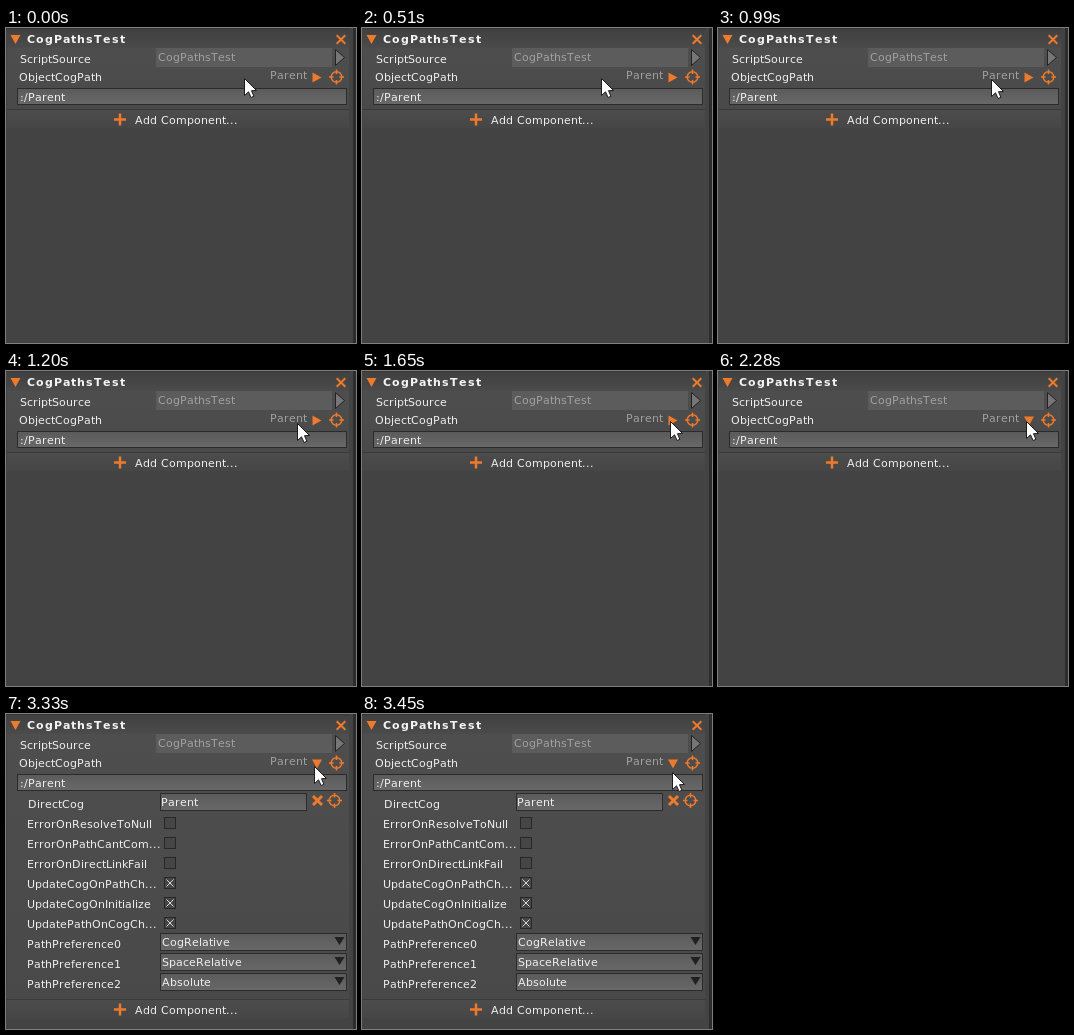
Write an HTML page with a canvas that moves like this. It is 350 px wide and 315 px high and loops after 3.48 s.

```html
<!DOCTYPE html>
<html lang="en">
<head>
<meta charset="utf-8">
<title>Property panel</title>
<style>
  html, body { margin: 0; width: 100%; height: 100%; overflow: hidden; background: #434343; }
  canvas { display: block; }
</style>
</head>
<body>
<canvas id="stage" width="350" height="315"></canvas>
<script>
const ctx = document.getElementById('stage').getContext('2d');
const LOOP = 3480, TICK = 30;
const OPEN_AT = 2280, EXPANDED = 204;
const ORANGE = '#ee7a2c', TEXT = '#eeeeee', DIM = '#a0a0a0', DARK = '#2b2b2b';

// Pointer stops: time, x, y, horizontal speed (px per ms)
const PATH = [
  [420, 238.5, 50, 0],
  [810, 257.5, 50, .07],
  [1200, 291.5, 52, .065],
  [1650, 308.5, 50, 0],
  [3300, 308.5, 50, 0],
  [3450, 310.5, 58, 0]
];

const CHECKS = [
  ['ErrorOnResolveToNull', false],
  ['ErrorOnPathCantCom...', false],
  ['ErrorOnDirectLinkFail', false],
  ['UpdateCogOnPathCh...', true],
  ['UpdateCogOnInitialize', true],
  ['UpdatePathOnCogCh...', true]
];
const PREFERENCES = ['CogRelative', 'SpaceRelative', 'Absolute'];

function rect(x, y, w, h, fill) {
  ctx.fillStyle = fill;
  ctx.fillRect(x, y, w, h);
}

function shade(x, y, w, h, top, bottom) {
  const g = ctx.createLinearGradient(0, y, 0, y + h);
  g.addColorStop(0, top);
  g.addColorStop(1, bottom);
  rect(x, y, w, h, g);
}

// Letters advance by whole pixels, as in hinted interface text.
// Widths come from a large size, where they are not yet rounded.
function text(str, x, baseline, color = TEXT, weight = 'normal', spacing = 0) {
  const font = size => `${weight} ${size}px "DejaVu Sans", sans-serif`;
  ctx.font = font(110);
  const advances = [...str].map(ch => Math.round(ctx.measureText(ch).width / 10 + .05) + spacing);
  ctx.font = font(11);
  ctx.fillStyle = color;
  advances.forEach((advance, i) => {
    ctx.fillText(str[i], x, baseline);
    x += advance;
  });
}

function polygon(points, fill, stroke) {
  ctx.beginPath();
  points.forEach(([x, y]) => ctx.lineTo(x, y));
  ctx.closePath();
  ctx.fillStyle = fill;
  ctx.fill();
  if (stroke) {
    ctx.strokeStyle = stroke;
    ctx.lineWidth = 1;
    ctx.stroke();
  }
}

function lines(color, width, ...segments) {
  ctx.strokeStyle = color;
  ctx.lineWidth = width;
  ctx.beginPath();
  for (const [x1, y1, x2, y2] of segments) {
    ctx.moveTo(x1, y1);
    ctx.lineTo(x2, y2);
  }
  ctx.stroke();
}

function cross(x, y, r, color, width) {
  lines(color, width, [x - r, y - r, x + r, y + r], [x - r, y + r, x + r, y - r]);
}

function field(x, y, w, h) {
  rect(x, y, w, h, DARK);
  shade(x + 1, y + 1, w - 2, h - 2, '#5b5b5b', '#686868');
}

function arrowDown(x, y) {
  polygon([[x - 5, y - 4], [x + 5, y - 4], [x, y + 5]], ORANGE);
}

function crosshair(x, y) {
  ctx.strokeStyle = ORANGE;
  ctx.lineWidth = 1.5;
  ctx.beginPath();
  ctx.arc(x, y, 5.3, 0, Math.PI * 2);
  ctx.stroke();
  lines(ORANGE, 1.5, [x - 7.5, y, x - 3, y], [x + 3, y, x + 7.5, y],
    [x, y - 7.5, x, y - 3], [x, y + 3, x, y + 7.5]);
}

function drawHeader(open) {
  shade(1, 1, 342, 19, '#404040', '#4b4b4b');
  rect(0, 0, 344, 1, '#363636');
  arrowDown(9.5, 11);
  text('CogPathsTest', 21, 15, '#f4f4f4', 'bold', 1);
  cross(335, 11.5, 4.3, ORANGE, 2);

  text('ScriptSource', 14, 35);
  rect(150, 20, 176, 19, '#5c5c5c');
  text('CogPathsTest', 152, 33, DIM);
  polygon([[329.5, 21.5], [338.5, 29.5], [329.5, 37.5]], '#767676', '#222222');

  text('ObjectCogPath', 13, 53);
  text('Parent', 264, 51, DIM);
  if (open) arrowDown(311, 49.5);
  else polygon([[306.5, 44.5], [315.5, 49.5], [306.5, 54.5]], ORANGE);
  crosshair(330.5, 49);

  field(11, 60, 330, 17);
  text(':/Parent', 14, 73);
}

function drawDetails() {
  text('DirectCog', 22, 94);
  field(154, 79, 147, 18);
  text('Parent', 155, 92);
  cross(311.5, 86.5, 4.5, ORANGE, 3);
  crosshair(328.5, 86.5);

  CHECKS.forEach(([label, checked], i) => {
    const y = 114 + i * 20;
    text(label, 21, y);
    rect(158, y - 11, 12, 12, '#272727');
    rect(159, y - 10, 10, 10, '#464646');
    if (checked) cross(164, y - 5, 3.5, '#d8d8d8', 1);
  });

  PREFERENCES.forEach((value, i) => {
    const y = 234 + i * 20;
    text('PathPreference' + i, 21, y);
    field(154, y - 15, 187, 18);
    text(value, 156, y - 2);
    polygon([[328.5, y - 11], [338.5, y - 11], [333.5, y - 3]], '#202020');
  });
}

function drawFooter(y) {
  rect(1, y + 81, 342, 1, '#3a3a3a');
  shade(1, y + 82, 342, 18, '#4c4c4c', '#464646');
  lines(ORANGE, 2.5, [108, y + 91.5, 120, y + 91.5], [114, y + 85.5, 114, y + 97.5]);
  text('Add Component...', 129, y + 96);
}

function pointerAt(t) {
  if (t <= PATH[0][0]) return PATH[0].slice(1, 3);
  const i = PATH.findIndex(p => p[0] >= t);
  const [t0, x0, y0, v0] = PATH[i - 1], [t1, x1, y1, v1] = PATH[i];
  const d = t1 - t0, u = (t - t0) / d, s = u * u * (3 - 2 * u);
  const x = x0 + (x1 - x0) * s + d * (v0 * u * (1 - u) ** 2 - v1 * u * u * (1 - u));
  return [x, y0 + (y1 - y0) * u];
}

function drawPointer(x, y) {
  const outline = [[0, 0], [0, 17], [4, 13.3], [6.6, 19], [9.4, 17.8], [7, 12.2], [12, 12]];
  polygon(outline.map(([dx, dy]) => [x + dx, y + dy]), '#ffffff', '#1c1c1c');
}

function draw(t) {
  const growth = Math.min(1, Math.max(0, (t - 2310) / 60));
  const offset = Math.round(EXPANDED * growth);
  rect(0, 0, 350, 315, '#434343');
  shade(1, 20, 342, 61 + offset, '#4e4e4e', '#494949');
  drawHeader(t >= OPEN_AT);
  if (growth > 0) {
    ctx.save();
    ctx.beginPath();
    ctx.rect(0, 78, 344, 2 + offset);
    ctx.clip();
    drawDetails();
    ctx.restore();
  }
  drawFooter(offset);
  rect(347, 0, 3, 315, '#2c2c2c');
  const [x, y] = pointerAt(t);
  drawPointer(Math.round(x - .5) + .5, Math.round(y) + .5);
}

function frame() {
  draw(Math.floor((performance.now() % LOOP) / TICK) * TICK);
  requestAnimationFrame(frame);
}
frame();
</script>
</body>
</html>
```
